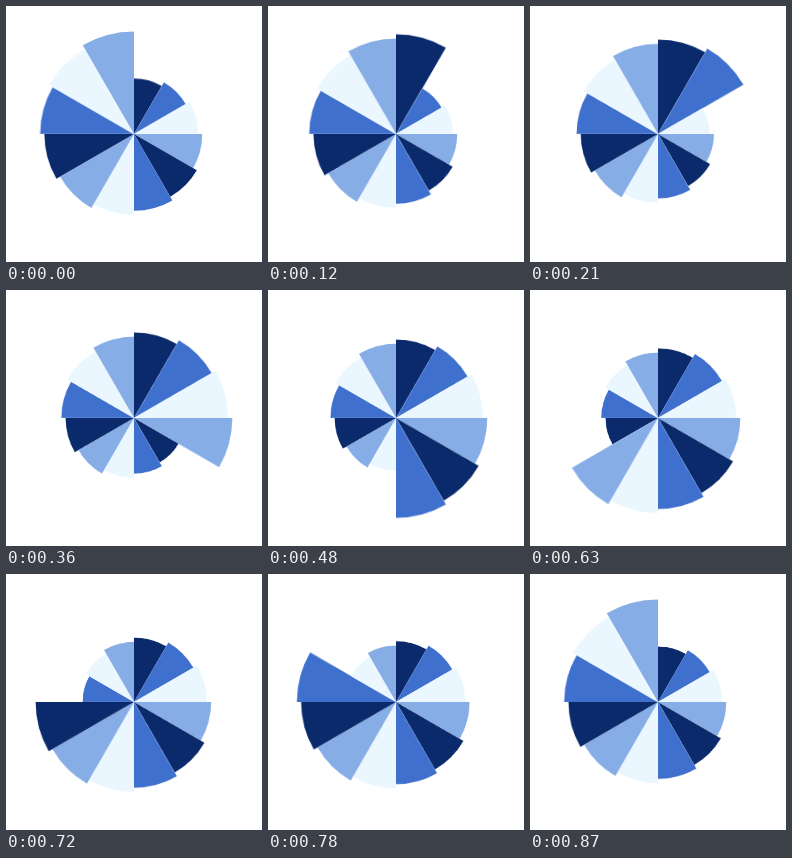
These frames come from a looping animation (256x256 px, 900 ms). An HTML page:

```html
<!DOCTYPE html>
<html lang="en">
<head>
<meta charset="utf-8">
<title>Radial spinner</title>
<style>
  html, body { margin: 0; width: 100%; height: 100%; overflow: hidden; background: #fff; }
  svg { display: block; width: 100vw; height: 100vh; }
  path { transform-origin: 0 0; }
</style>
</head>
<body>
<svg viewBox="0 0 256 256"><g id="fan" transform="translate(128 128)"></g></svg>
<script>
  const COLORS = ['#0a2a6c', '#4070cd', '#ebf7ff', '#87ade6'];
  const SECTORS = 12, RADIUS = 102.4, SHRINK = 0.5;
  const STEPS = 30, DURATION = 900;
  const fan = document.getElementById('fan');

  const rim = k => {
    const a = (k / SECTORS) * 2 * Math.PI;
    return `${(RADIUS * Math.sin(a)).toFixed(3)} ${(-RADIUS * Math.cos(a)).toFixed(3)}`;
  };

  // Each sector shrinks linearly, then snaps back to full size.
  // The final step repeats the first, so the cycle holds there.
  const scaleAt = (k, step) => {
    const phase = (step % (STEPS - 1)) / (STEPS - 1);
    return 1 - SHRINK * ((phase + (SECTORS - 1 - k) / SECTORS) % 1);
  };

  for (let k = 0; k < SECTORS; k++) {
    const path = document.createElementNS('http://www.w3.org/2000/svg', 'path');
    path.setAttribute('d', `M0 0L${rim(k)}A${RADIUS} ${RADIUS} 0 0 1 ${rim(k + 1)}Z`);
    path.setAttribute('fill', COLORS[k % COLORS.length]);
    fan.append(path);

    const frames = Array.from({ length: STEPS + 1 }, (_, i) => ({
      // A hair early, so rounding never delays a step.
      offset: i % STEPS ? i / STEPS - 1e-4 : i / STEPS,
      transform: `scale(${scaleAt(k, i % STEPS)})`,
      easing: 'step-end'
    }));
    path.animate(frames, { duration: DURATION, iterations: Infinity });
  }
</script>
</body>
</html>
```
